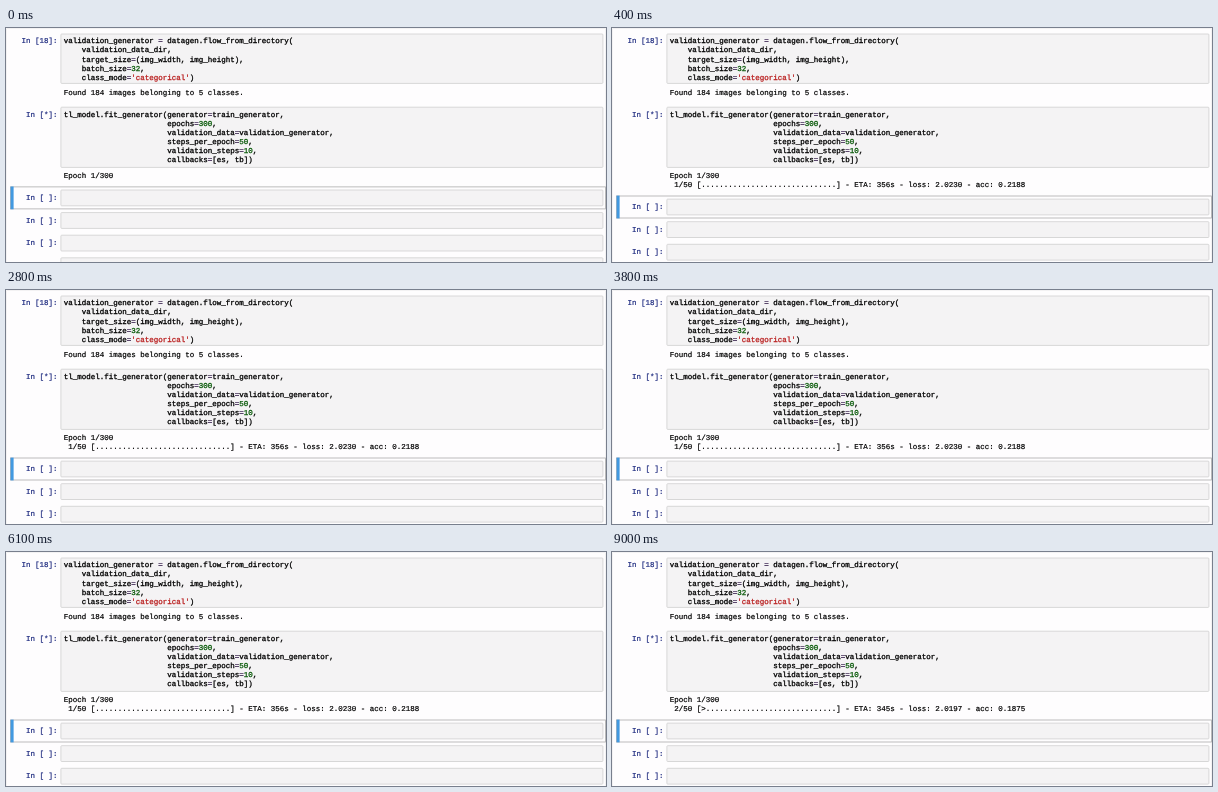
Write an HTML page that moves like this. It is 600 px wide and 234 px high and loops after 9.1 s.

```html
<!DOCTYPE html>
<html lang="en">
<head>
<meta charset="utf-8">
<title>Notebook training</title>
<style>
  html, body { margin: 0; width: 100%; height: 100%; overflow: hidden; background: #fefdfe; }
  svg { display: block; width: 600px; height: 234px; }
  text { font: 7.51px "Liberation Mono", "Courier New", monospace; white-space: pre; text-rendering: geometricPrecision; fill: #000; stroke: #000; stroke-width: .2; }
  .prompt { fill: #1f2c80; stroke: #1f2c80; text-anchor: end; }
  .code { stroke-width: .3; }
  .str { fill: #ba2121; stroke: #ba2121; }
  .num { fill: #0a5a0a; stroke: #0a5a0a; }
  .op { fill: #46305a; stroke: #46305a; }
  .box { fill: #f4f3f4; stroke: #d0d0d0; stroke-width: .8; }
</style>
</head>
<body>
<svg viewBox="0 0 600 234">
  <path d="M.5 234V.5H599.5V234" fill="none" stroke="#f3f2f3"/>
  <g id="cells"></g>
  <text id="progress" x="57.7" y="159"></text>
  <g id="empty">
    <rect x="4.5" y="158.9" width="595" height="22" fill="#fefdfe" stroke="#ababab" stroke-width=".8"/>
    <rect x="4.6" y="158.5" width="3" height="22.8" fill="#4299e0"/>
  </g>
</svg>
<script>
const LOOP = 9100, FIRST = 350, SECOND = 7550, LINE = 9.1;
const $ = id => document.getElementById(id);
const cells = $("cells"), empty = $("empty"), progress = $("progress");

function add(parent, name, attrs, html = "") {
  const el = document.createElementNS("http://www.w3.org/2000/svg", name);
  for (const key in attrs) el.setAttribute(key, attrs[key]);
  el.innerHTML = html;
  parent.append(el);
}

const span = (cls, s) => `<tspan class='${cls}'>${s}</tspan>`;
const highlight = s => s.replace(/'\w+'|=|\b\d+\b/g, m =>
  span(m[0] === "'" ? "str" : m === "=" ? "op" : "num", m));

const line = (y, html, cls = "output") => add(cells, "text", { class: cls, x: 57.7, y }, html);

function cell(parent, top, height, label, code = []) {
  add(parent, "rect", { class: "box", x: 54.9, y: top, width: 542, height, rx: .8 });
  add(parent, "text", { class: "prompt", x: 51.6, y: top + (code.length ? 9.3 : 10.2) }, label);
  code.forEach((s, i) => line(top + 9.3 + i * LINE, highlight(s), "code"));
}

cell(cells, 6, 49.4, "In [18]:", [
  "validation_generator = datagen.flow_from_directory(",
  "    validation_data_dir,",
  "    target_size=(img_width, img_height),",
  "    batch_size=32,",
  "    class_mode='categorical')"
]);
line(67.4, "Found 184 images belonging to 5 classes.");

const pad = " ".repeat(23);
cell(cells, 79.2, 60.2, "In [*]:", [
  "tl_model.fit_generator(generator=train_generator,",
  pad + "epochs=300,",
  pad + "validation_data=validation_generator,",
  pad + "steps_per_epoch=50,",
  pad + "validation_steps=10,",
  pad + "callbacks=[es, tb])"
]);
line(149.9, "Epoch 1/300");

for (let i = 0; i < 4; i++) cell(empty, 162 + i * 22.6, 15.8, "In [ ]:");

const status = (step, bar, eta, loss, acc) =>
  ` ${step}/50 [${bar.padEnd(30, ".")}] - ETA: ${eta}s - loss: ${loss} - acc: ${acc}`;

function draw(now) {
  const t = now % LOOP;
  progress.textContent = t < FIRST ? ""
    : t < SECOND ? status(1, "", 356, "2.0230", "0.2188")
    : status(2, ">", 345, "2.0197", "0.1875");
  empty.setAttribute("transform", `translate(0 ${t < FIRST ? 0 : LINE})`);
  requestAnimationFrame(draw);
}
draw(performance.now());
</script>
</body>
</html>
```
